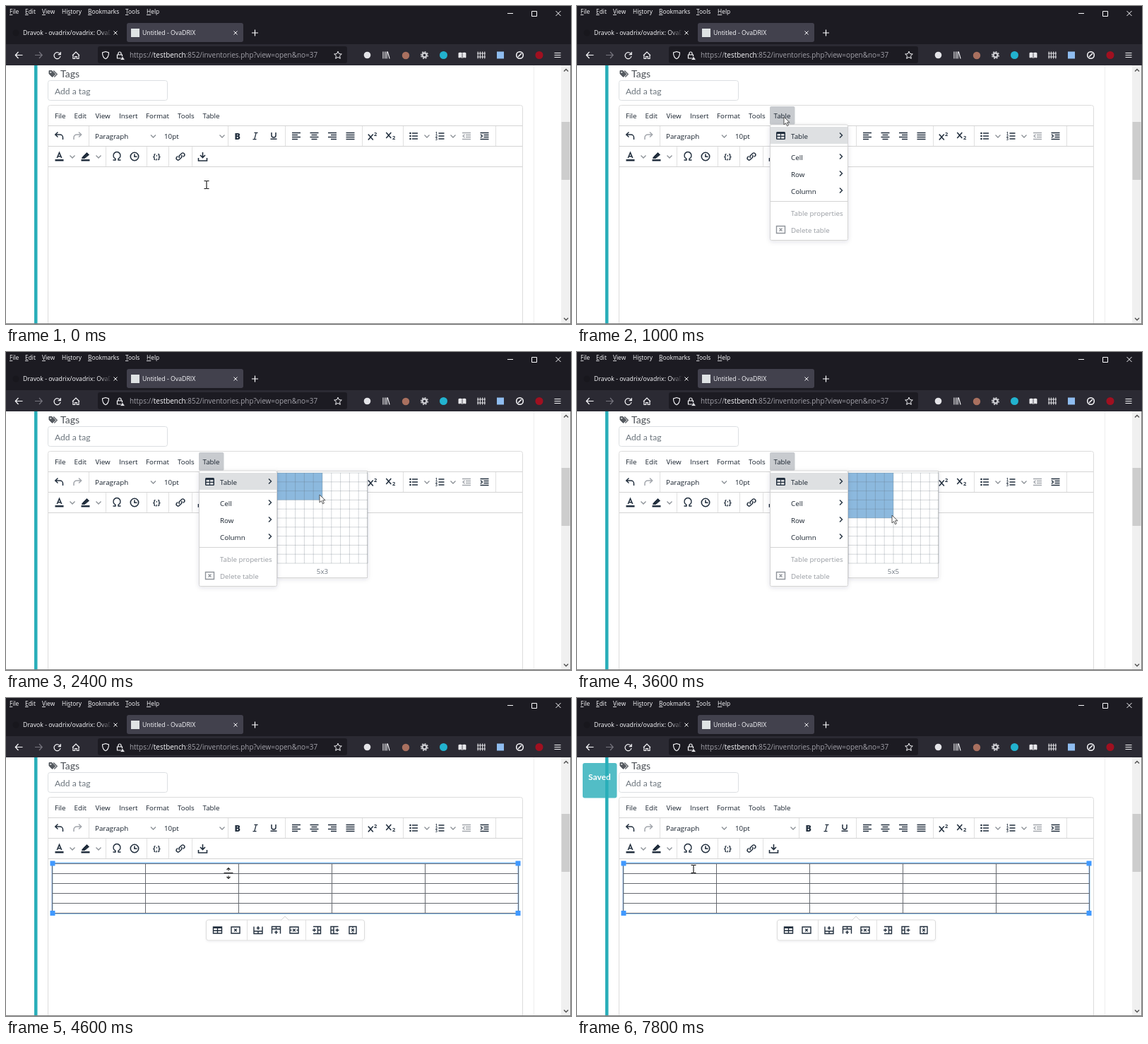
An HTML page that plays this animation: 800x450 px, repeating every 8000 ms.

```html
<!DOCTYPE html>
<html lang="en">
<head>
<meta charset="utf-8">
<title>Inserting a table</title>
<style>
html, body { margin: 0; width: 100%; height: 100%; overflow: hidden; background: #fff; }
svg { display: block; width: 100vw; height: 100vh; }
text { font-family: "Open Sans", "Noto Sans", sans-serif; white-space: pre; }
.lato { font-family: Lato, sans-serif; }
.u { text-decoration: underline; }
</style>
</head>
<body>
<svg id="stage" viewBox="0 0 800 450"></svg>
<script>
const INK = '#222f3e', DARK = '#16202c', PALE = '#a3a7ad', LIGHT = '#fbfbfe', TEAL = '#29aeb9', BLUE = '#4099ff';
const LOOP = 8000, STEP = 200, TOP = 84;

// Markup helpers
const text = (x, y, s, size = 9.8, fill = DARK, attrs = '') =>
  `<text x="${x}" y="${y}" font-size="${size}" fill="${fill}" ${attrs}>${s}</text>`;
const rect = (x, y, w, h, fill, attrs = '') =>
  `<rect x="${x}" y="${y}" width="${w}" height="${h}" fill="${fill}" ${attrs}/>`;
const path = (d, stroke = INK, width = 1, attrs = '') =>
  `<path d="${d}" fill="none" stroke="${stroke}" stroke-width="${width}" ${attrs}/>`;
const icon = (x, y, d, stroke = INK, width = 1.5, attrs = '') =>
  path(d, stroke, width, `transform="translate(${x} ${y})" ${attrs}`);
const dot = (x, y, r, fill) => `<circle cx="${x}" cy="${y}" r="${r}" fill="${fill}"/>`;
const circle = r => `M${-r} 0a${r} ${r} 0 1 1 ${2 * r} 0a${r} ${r} 0 1 1 ${-2 * r} 0`;
const chevDown = (x, y) => icon(x, y, 'M-3.5 -1.5L0 2L3.5 -1.5', '#8b9096', 1.3);
const chevRight = (x, y) => icon(x, y, 'M-2 -3.5L1.5 0L-2 3.5', INK, 1.4);
const vlines = (xs, y, h, color) => path(xs.map(x => `M${x} ${y}v${h}`).join(''), color);
const range = n => [...Array(n).keys()];

function browser() {
  const menus = [[5, '', 'F', 'ile'], [27, '', 'E', 'dit'], [51, '', 'V', 'iew'], [79, 'Hi', 's', 'tory'],
    [116, '', 'B', 'ookmarks'], [169, '', 'T', 'ools'], [199, '', 'H', 'elp']];
  const close = 'M-2.5 -2.5L2.5 2.5M2.5 -2.5L-2.5 2.5';
  return rect(0, 0, 800, 54, '#1c1b22') + rect(0, 54, 800, TOP - 54, '#2b2a33') +
    menus.map(([x, a, key, b]) =>
      text(x, 11, `${a}<tspan class="u">${key}</tspan>${b}`, 8.4, LIGHT)).join('') +
    icon(714, 10.5, 'M-4 0h8', LIGHT, 1) + icon(748, 11, 'M-3.5 -3.5h7v7h-7z', LIGHT, 1) +
    icon(782, 10.5, 'M-3.5 -3.5l7 7M3.5 -3.5l-7 7', LIGHT, 1) +
    // tabs
    dot(14, 38, 4.5, '#18171d') +
    text(24, 41, 'Dravok - ovadrix/ovadrix: OvaDRIX', 8.75, LIGHT) +
    rect(132, 30, 17, 16, 'url(#fade)') + rect(149, 30, 22, 16, '#1c1b22') +
    icon(155, 38, close, LIGHT, 1) +
    rect(171, 24, 165, 27, '#42414d', 'rx="3"') + rect(177, 32, 12, 12, '#dfe3e4') +
    text(193, 41, 'Untitled - OvaDRIX', 8.75, LIGHT) +
    icon(325, 38, close, LIGHT, 1) + icon(352.5, 38, 'M-4.5 0h9M0 -4.5v9', LIGHT, 1.2) +
    // navigation
    icon(18.5, 69.5, 'M5 0h-10M-1 -4.5L-5.2 0L-1 4.5', LIGHT, 1.2) +
    icon(46, 69.5, 'M-5 0h10M1 -4.5L5.2 0L1 4.5', '#77767f', 1.2) +
    icon(72.5, 70, 'M4 -2a4.5 4.5 0 1 0 .5 3M4.8 -5v3.6h-3.6', LIGHT, 1.2) +
    icon(99, 70, 'M-5 0L0 -5L5 0M-4 -1v5.5h2.7v-3h2.6v3h2.7v-5.5', LIGHT, 1.2) +
    rect(130, 57, 353, 24, '#1c1b22', 'rx="3"') +
    icon(141, 69.5, 'M0 -5L4.5 -3.5C4.5 1 3 4 0 5.2C-3 4 -4.5 1 -4.5 -3.5z', LIGHT, 1.1) +
    icon(161, 69.5, 'M-3.5 -.5h7v5h-7zM-2 -.5v-2a2 2 0 0 1 4 0v2', LIGHT, 1.2) +
    path('M165 71l3.5 5.5h-7z', '#1c1b22', .8, 'style="fill:#e8e8ec"') +
    text(175, 73, `https://<tspan fill="${LIGHT}">testbench</tspan>:852/inventories.php?view=open&amp;no=37`, 9.93, '#a2a1a9') +
    icon(470, 69.5, 'M0 -5.3L1.6 -1.8L5.3 -1.5L2.5 1.1L3.3 4.8L0 2.9L-3.3 4.8L-2.5 1.1L-5.3 -1.5L-1.6 -1.8z', LIGHT, 1) +
    // toolbar buttons
    dot(511.5, 69.5, 4.8, '#e4e4e8') +
    icon(538, 69.5, 'M-4 -5v10M-1.2 -5v10M1.2 -5v10M2.3 -5l2.8 10', LIGHT, 1.1) +
    dot(566, 70, 5.2, '#a9705f') +
    icon(592.5, 69.5, circle(3), '#cfcfd4', 2.4) + icon(592.5, 69.5, circle(4.9), '#cfcfd4', 1.4, 'stroke-dasharray="1.9 1.95"') +
    dot(619.5, 69.5, 5.5, '#22b3cf') +
    path('M641 66.5q2.8 -1 5 .5q2.2 -1.5 5 -.5v6.5q-2.8 -1 -5 .5q-2.2 -1.5 -5 -.5z', LIGHT, .8, 'style="fill:#e6e6ea"') + path('M646 67v7', '#2b2a33', .8) +
    icon(673, 69.5, 'M-4.8 -5v10M-1.6 -5v10M1.6 -5v10M4.8 -5v10M-6 -2.5h12M-6 2.5h12', '#e0e0e4', 1.1) +
    rect(695, 64.5, 10, 10, '#8fbdf0') +
    icon(727.5, 69.5, circle(4.8) + 'M-2.5 2.5L2.5 -2.5', LIGHT, 1.5) +
    dot(755, 69.5, 5.5, '#a01020') +
    icon(781, 69.5, 'M-4.5 -3h9M-4.5 0h9M-4.5 3h9', LIGHT, 1.1);
}

function alignIcon(x, align) {
  return icon(x, 184, range(4).map(i => {
    const w = i % 2 && align !== 'full' ? 8 : 12;
    const left = align === 'right' ? 6 - w : align === 'mid' ? -w / 2 : -6;
    return `M${left} ${i * 3 - 4.5}h${w}`;
  }).join(''));
}

const indent = (x, dir, color) =>
  icon(x, 184, `M-6 -4.5h12M-1 -1.5h7M-1 1.5h7M-6 4.5h12M${-4 - dir * 1.5} -2.2l${dir * 2.4} 2.2l${-dir * 2.4} 2.2`, color);

function editor() {
  const menus = [[69, 'File'], [96.5, 'Edit'], [126.5, 'View'], [160, 'Insert'], [198, 'Format'], [243, 'Tools']];
  const listLines = 'M-2 -4h8M-2 0h8M-2 4h8';
  return rect(59.5, 140.5, 672, 330, '#fff', 'rx="3" stroke="#dcdcdc"') +
    path('M60 169.5h671M60 198.5h671M60 227.5h671', '#d4d4d4') +
    vlines([117.5, 314.5, 395.5, 504.5, 562.5, 693.5], 170, 28, '#e0e0e0') +
    vlines([141.5, 199.5, 230.5, 263.5], 199, 28, '#e0e0e0') +
    menus.map(([x, s]) => text(x, 159, s)).join('') +
    // first row
    icon(75, 184, 'M-1.5 -5.5L-5.2 -2L-1.5 1.5M-5 -2h6.5a4 4 0 0 1 4 4v3') +
    icon(101.5, 184, 'M1.5 -5.5L5.2 -2L1.5 1.5M5 -2h-6.5a4 4 0 0 0 -4 4v3', PALE) +
    text(126, 188, 'Paragraph') + chevDown(208.5, 184) +
    text(224, 188, '10pt') + chevDown(306, 184) +
    text(323.5, 188.5, 'B', 12.5, INK, 'font-weight="800"') +
    icon(353, 184, 'M-1.5 -4.7h5M-3.5 4.7h5M1.2 -4.7L-1.2 4.7', INK, 1.3) +
    icon(379, 183, 'M-3 -4v4a3 3 0 0 0 6 0v-4M-4.5 5.3h9', INK, 1.5) +
    alignIcon(411, 'left') + alignIcon(436.5, 'mid') + alignIcon(462, 'right') + alignIcon(487.5, 'full') +
    icon(516.5, 185, 'M-3.7 -3.5l7 8M3.3 -3.5l-7 8', INK, 1.6) + text(521, 183.5, '2', 7.5, INK, 'font-weight="700"') +
    icon(542, 183, 'M-3.7 -4l7 8M3.3 -4l-7 8', INK, 1.6) + text(547, 189, '2', 7.5, INK, 'font-weight="700"') +
    icon(577, 184, listLines) + [180, 184, 188].map(y => dot(572.5, y, 1.3, INK)).join('') + chevDown(596, 184) +
    icon(614.5, 184, listLines) + [1, 2, 3].map(n => text(608, 178.5 + n * 4 - .5, n, 5, INK, 'font-weight="700"')).join('') + chevDown(633, 184) +
    indent(652, -1, PALE) + indent(677.5, 1, INK) +
    // second row
    icon(75.5, 212, 'M-3.2 3L0 -4.5L3.2 3M-2 .8h4', INK, 1.6) + rect(69.5, 217, 12, 2.5, INK) + chevDown(94, 213) +
    path('M108.5 213.5l6 -6l3 3l-6 5h-4z', INK, 1, `style="fill:${INK}"`) + rect(106.5, 217, 12, 2.5, INK) + chevDown(131, 213) +
    icon(157, 213, 'M-5.5 5h3.5v-1.8a5 5 0 1 1 4 0v1.8h3.5') +
    icon(182, 213, circle(5.7) + 'M0 -3.5v3.8h3.5', INK, 1.6) +
    text(208, 216.5, '{;}', 10, INK, 'font-weight="700"') +
    icon(247, 213, 'M-1.3 2a2.5 2.5 0 0 1 0 -3.5l2.8 -2.8a2.5 2.5 0 0 1 3.6 3.6l-1.3 1.3M1.3 -2a2.5 2.5 0 0 1 0 3.5l-2.8 2.8a2.5 2.5 0 0 1 -3.6 -3.6l1.3 -1.3', INK, 1.4) +
    icon(278.5, 213, 'M0 -6v7M-3.5 -2L0 1.5L3.5 -2M-6 2v4h12v-4', INK, 1.6);
}

function page() {
  const tag = 'M-5.5 -4.5h4l5 5l-4.5 4l-4.5 -4.5z';
  return rect(0, TOP, 800, 450 - TOP, '#fff') + rect(40, TOP, 4.5, 450 - TOP, TEAL) +
    path(`M747.5 ${TOP}v366`, '#eeeeee') +
    rect(786, TOP, 13, 366, '#f0f0f0') + rect(786.5, 164, 12, 82, '#cdcdcd') +
    icon(793, 91, 'M-3 1.5L0 -1.5L3 1.5', '#555') + icon(793, 443, 'M-3 -1.5L0 1.5L3 -1.5', '#555') +
    path(tag, '#555a60', 1, 'transform="translate(66.5 96)" style="fill:#555a60"') +
    icon(66.5, 96, 'M.8 -4.5l5 5l-4 4', '#555a60', 1.2) + dot(63.3, 93.8, 1, '#fff') +
    text(77, 101, 'Tags', 14, '#4b5056', 'class="lato"') +
    rect(59.5, 105.5, 169, 28, '#fff', 'rx="3" stroke="#dcdfe2"') +
    text(69, 124.5, 'Add a tag', 12.1, '#6c757d', 'class="lato"') +
    editor() + path(`M799.5 ${TOP}v366M0 449.5h800`, '#808080');
}

function menu() {
  const items = [[218, 'Cell'], [242, 'Row'], [266, 'Column']];
  return rect(273.5, 168, 110, 163.5, '#fff', 'rx="2" stroke="#d4d4d4" filter="url(#shadow)"') +
    rect(274, 171, 109, 24, '#dee0e2') + path('M274 198.5h109M274 276.5h109', '#d4d4d4') +
    rect(282, 178, 13, 11, INK, 'rx="1.5"') +
    [[283.5, 181], [289, 181], [283.5, 185], [289, 185]].map(([x, y]) => rect(x, y, 4.5, 2.7, '#dee0e2')).join('') +
    text(303, 187.5, 'Table') + chevRight(374, 183) +
    items.map(([y, s]) => text(303, y, s) + chevRight(374, y - 5)).join('') +
    text(303, 296.5, 'Table properties', 9.75, '#979ba1') +
    text(303, 320.5, 'Delete table', 9.75, '#979ba1') +
    icon(288.5, 316.5, 'M-6 -5h12v10h-12zM-2 -2l4 4M2 -2l-4 4', '#8f949a', 1.4);
}

const CELL = 12.8, GRID_X = 384, GRID_Y = 171;
function sizePicker() {
  const lines = range(11).map(i =>
    `M${GRID_X + i * CELL} ${GRID_Y}v128M${GRID_X} ${GRID_Y + i * CELL}h128`).join('');
  return rect(384, 168.5, 127.5, 151, '#fff', 'stroke="#d4d4d4" filter="url(#shadow)"') +
    `<rect id="picked" x="${GRID_X}" y="${GRID_Y}" fill="#8cb9de"/>` +
    path(lines, '#5a6470', .8, 'opacity=".33"') +
    text(448, 313.5, '', 9.75, '#6f7780', 'id="size" text-anchor="middle"');
}

const ROWS = range(6).map(i => 234.5 + i * 14);
function table() {
  const frame = 'M-6 -4.5h12v9h-12z';
  const cross = 'M-1.8 -1.8l3.6 3.6M1.8 -1.8l-3.6 3.6';
  const tools = [
    [299.5, frame + 'M-6 -3.3h12M0 -4v8M-6 .7h12'], [325, frame + cross],
    [357, 'M-6 -5v10h12v-10M-6 1.5h12M0 1.5v3.5M0 -5.5v5M-2.2 -3h4.4'],
    [382.5, 'M-6 5v-10h12v10M-6 -1.5h12M0 -5v3.5M0 .5v5M-2.2 3h4.4'],
    [408, frame + 'M-6 0h2.5M6 0h-2.5' + cross],
    [440, 'M-5 -5h10.5v10h-10.5M1.5 -5v10M1.5 0h4M-6 0h5M-3.5 -2.2v4.4'],
    [465.5, 'M5 -5h-10.5v10h10.5M-1.5 -5v10M-1.5 0h-4M1 0h5M3.5 -2.2v4.4'],
    [491, 'M-5 -5h10v10h-10zM0 -5v2M0 5v-2' + cross]];
  const corners = [[66, 234], [725, 234], [66, 304.5], [725, 304.5]];
  return rect(65.5, 233.5, 660, 71.5, 'none', `stroke="${BLUE}" stroke-width="2" opacity=".6"`) +
    path(ROWS.map(y => `M66 ${y}h660`).join('') +
      range(6).map(i => `M${65.5 + i * 132} 234v71`).join(''), '#666a70') +
    corners.map(([x, y]) => rect(x - 3.5, y - 3.5, 7, 7, BLUE)).join('') +
    rect(283.5, 314, 224, 29, '#fff', 'rx="3" stroke="#dcdcdc" filter="url(#soft)"') +
    path('M389.5 314.5L395 309L400.5 314.5', '#d4d4d4', 1, 'style="fill:#fff"') +
    vlines([341.5, 424.5], 314, 29, '#e0e0e0') +
    tools.map(([x, d]) => icon(x, 328.5, d, INK, 1.4)).join('');
}

const shadow = (id, blur, alpha) =>
  `<filter id="${id}" x="-20%" y="-20%" width="140%" height="140%"><feDropShadow dx="0" dy="1.5" stdDeviation="${blur}" flood-color="${INK}" flood-opacity="${alpha}"/></filter>`;

const stage = document.getElementById('stage');
stage.innerHTML = `<defs>
  <linearGradient id="fade"><stop stop-color="#1c1b22" stop-opacity="0"/><stop offset="1" stop-color="#1c1b22"/></linearGradient>
  ${shadow('shadow', 3, .13)}${shadow('soft', 1.5, .06)}
</defs>` +
  page() + browser() +
  `<g id="table">${table()}</g>
  <g id="button">${rect(273, 142, 35.5, 26, '#c8cbcf', 'rx="2"')}</g>` + text(278.5, 159, 'Table') +
  `<g id="picker">${sizePicker()}</g><g id="menu">${menu()}</g>
  <g id="toast">${rect(8, 92, 48.5, 49.5, TEAL, 'rx="3"')}${text(32, 116, 'Saved', 12, '#fff', 'class="lato" font-weight="700" text-anchor="middle"')}</g>
  <g id="arrow">${path('M0 0v11l2.6 -2.4l1.9 4.2l1.9 -.9l-1.9 -4.1h3.6z', '#444', .9, 'style="fill:#fff"')}</g>
  <g id="beam">${path('M-3.5 -5.5h2.5l1 .7l1 -.7h2.5M-3.5 5.5h2.5l1 -.7l1 .7h2.5M0 -5v10', '#111', 1.1)}</g>
  <g id="resize">${path('M-6.5 -.5h13M0 -3.5v-3.5M-2.5 -5L0 -7.5L2.5 -5M0 3.5v3.5M-2.5 5L0 7.5L2.5 5', '#222', 1.1)}</g>`;

const $ = id => document.getElementById(id);
const show = (id, on) => { $(id).style.display = on ? '' : 'none'; };
const clamp = (v, lo, hi) => Math.min(hi, Math.max(lo, v));

// Mouse track: time, x, y
const track = [[0, 284, 253], [200, 284, 251], [800, 293, 157], [1000, 293, 157], [1400, 316, 182],
  [1800, 392, 181], [2400, 444, 202], [2600, 444, 203], [3200, 446, 231], [3800, 446, 231],
  [4600, 315, 248], [4800, 315, 248], [6000, 165, 242]];

function mouseAt(t) {
  const i = track.findIndex(k => k[0] > t);
  if (i < 0) return track[track.length - 1].slice(1);
  const [t0, x0, y0] = track[i - 1], [t1, x1, y1] = track[i];
  const p = (t - t0) / (t1 - t0), e = p * p * (3 - 2 * p);
  return [x0 + (x1 - x0) * e, y0 + (y1 - y0) * e];
}

function draw(t) {
  const [x, y] = mouseAt(t);
  const open = t >= 1000 && t < 3800, picking = t >= 1400 && open, inserted = t >= 3800;
  show('button', open);
  show('menu', open);
  show('picker', picking);
  show('table', inserted);

  const cols = clamp(Math.ceil((x - GRID_X) / CELL), 0, 10);
  const rows = cols && clamp(Math.ceil((y - GRID_Y) / CELL), 0, 10);
  $('picked').setAttribute('width', cols * CELL);
  $('picked').setAttribute('height', rows * CELL);
  $('size').textContent = `${cols}x${rows}`;

  const onRow = inserted && ROWS.some(r => Math.abs(r - y) < 4);
  const cursor = onRow ? 'resize' : !open && y > 228 ? 'beam' : 'arrow';
  for (const id of ['arrow', 'beam', 'resize']) show(id, id === cursor);
  $(cursor).setAttribute('transform', `translate(${x.toFixed(1)} ${y.toFixed(1)})`);

  // The toast appears at once, then fades slowly
  show('toast', t >= 7000);
  $('toast').setAttribute('opacity', .5 + .5 * Math.cos(Math.PI * clamp((t - 7000) / 2733, 0, 1)));
}

const start = performance.now();
function tick() {
  const t = (performance.now() - start) % LOOP;
  draw(Math.floor(t / STEP) * STEP);
  requestAnimationFrame(tick);
}
tick();
</script>
</body>
</html>
```
